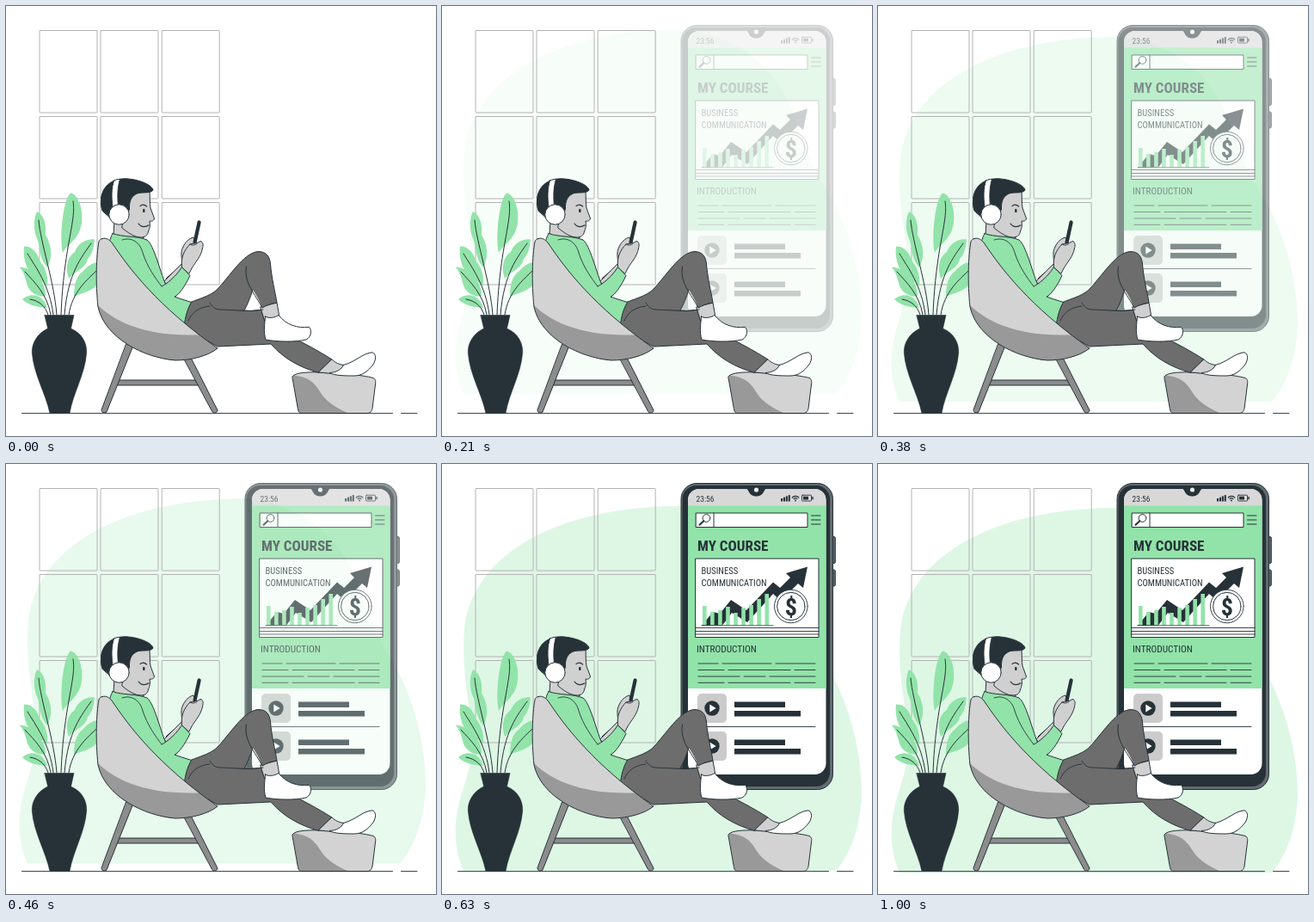
Animation, 500 px wide and 500 px high, one loop 1040 ms. Source, as an HTML page with a canvas:

```html
<!DOCTYPE html>
<html lang="en">
<head>
<meta charset="utf-8">
<title>Online course</title>
<style>
html, body { margin: 0; width: 100%; height: 100%; overflow: hidden; background: #fff; }
canvas { display: block; width: 100vw; height: 100vh; }
</style>
</head>
<body>
<canvas id="stage"></canvas>
<script>
const SIZE = 500, LOOP = 1040, START = 130, STEP = 1000 / 24, FADE_STEPS = 13, LAST_STEP = 22;
const INK = '#263238', GREEN = '#92e3a9', SKIN = '#d0d0d0', PANTS = '#6d6d6d';
const LIGHT = '#d3d3d3', SHADE = '#999', WHITE = '#fff', WIRE = '#b3b3b3';
const FACE = '"Roboto Condensed", Roboto, "Open Sans", "Noto Sans", sans-serif';
const scale = Math.max(1, window.devicePixelRatio || 1);

function setUp(canvas) {
  canvas.width = canvas.height = SIZE * scale;
  const c = canvas.getContext('2d');
  c.scale(scale, scale);
  c.lineJoin = c.lineCap = 'round';
  return c;
}

function layer(paint) {
  const canvas = document.createElement('canvas');
  paint(setUp(canvas));
  return canvas;
}

function shape(c, d, fill, stroke = INK, width = 1) {
  const p = typeof d === 'string' ? new Path2D(d) : d;
  if (fill) { c.fillStyle = fill; c.fill(p); }
  if (stroke) { c.strokeStyle = stroke; c.lineWidth = width; c.stroke(p); }
}

function line(c, d, color = INK, width = 1) { shape(c, d, null, color, width); }

function box(c, x, y, w, h, r, fill, stroke = null, width = 1) {
  const p = new Path2D();
  p.roundRect(x, y, w, h, r);
  shape(c, p, fill, stroke, width);
}

function disc(c, x, y, r, fill, stroke = null, width = 1) {
  const p = new Path2D();
  p.arc(x, y, r, 0, Math.PI * 2);
  shape(c, p, fill, stroke, width);
}

// Fills a body, shades the part under a second path, then outlines it.
function shaded(c, body, shadow) {
  shape(c, body, LIGHT, null);
  c.save();
  c.clip(new Path2D(body));
  shape(c, shadow, SHADE, null);
  c.restore();
  line(c, body);
}

function label(c, text, x, y, size, weight = 400, align = 'left') {
  c.font = `${weight} condensed ${size}px ${FACE}`;
  c.textAlign = align;
  c.fillStyle = INK;
  c.fillText(text, x, y);
}

const blobPath = new Path2D('M25 475 C16 455 13 430 18 405 C24 375 38 350 35 315 C32 280 22 240 26 195 ' +
  'C33 115 120 55 265 51 C335 49 385 92 405 140 C420 180 425 205 447 236 ' +
  'C470 272 488 330 488 385 C487 425 474 457 458 475 Z');

function drawWindow(c) {
  for (const y of [28.5, 128.5, 228.5])
    for (const x of [39, 110, 181.2]) box(c, x, y, 67, 95.5, 0.5, null, WIRE);
}

function drawStatus(c) {
  label(c, '23:56', 295.5, 44, 9.5);
  for (let i = 0; i < 4; i++) box(c, 394 + i * 2.9, 40 - i * 1.3, 2.1, 3.5 + i * 1.3, 0, INK);
  for (const r of [2.6, 5]) {
    const arc = new Path2D();
    arc.arc(411, 42.3, r, Math.PI * 1.23, Math.PI * 1.77);
    line(c, arc, INK, 1.2);
  }
  disc(c, 411, 42.4, 1, INK);
  box(c, 418.5, 36.2, 11, 6.8, 0.8, null, INK, 0.9);
  box(c, 420, 37.7, 6, 3.8, 0, INK);
  box(c, 430.3, 38, 1.4, 3.2, 0, INK);
}

function drawChart(c) {
  box(c, 295, 110, 143, 91.5, 0, WHITE, INK);
  line(c, 'M295 190.5 H438 M295 194.5 H438 M295 198 H438', INK, 0.9);
  label(c, 'BUSINESS', 301.5, 128.3, 10.6);
  label(c, 'COMMUNICATION', 301.5, 142.3, 10.6);
  shape(c, 'M302 188 L315 172 L323 174 L336 158 L354 170 L385 137.5 L393 144 L405 132 L400 127 ' +
    'L425 119.5 L420 144 L414 139 L394 159 L385 151 L355 184 L337 173 L326 187.5 Z', INK, null);
  [165, 172, 170, 166, 173, 167, 164, 157, 151].forEach((y, i) => box(c, 303 + i * 9.05, y, 4.6, 187.5 - y, 0, GREEN));
  line(c, 'M302 187.8 H385', INK, 0.8);
  disc(c, 405.8, 165.5, 19.3, WHITE, INK, 0.9);
  disc(c, 405.8, 165.5, 16.2, null, INK, 1);
  label(c, '$', 405.8, 175.5, 28, 700, 'center');
}

function drawLesson(c, y) {
  box(c, 297, y, 34, 34, 5, '#cbcbcb');
  disc(c, 314, y + 17, 8.7, INK);
  shape(c, `M311.3 ${y + 12.6} L318.6 ${y + 17} L311.3 ${y + 21.4} Z`, WHITE, null);
  box(c, 340, y + 9.5, 59, 6.5, 0, INK);
  box(c, 340, y + 20, 77, 6.5, 0, INK);
}

function drawPhone(c) {
  box(c, 453, 84.5, 4.3, 31, 1.5, '#5f686c', INK);
  box(c, 453, 123, 4.3, 19, 1.5, '#5f686c', INK);
  box(c, 278, 22.5, 176.5, 356, 18, '#626b6f', INK);
  box(c, 279.5, 25, 171.5, 350, 16, INK);

  c.save();
  const screen = new Path2D();
  screen.roundRect(286, 29, 160.5, 332, 13);
  c.clip(screen);
  box(c, 286, 29, 161, 332, 0, WHITE);
  box(c, 286, 29, 161, 20, 0, '#d8d8d8');
  box(c, 286, 48.5, 161, 212.5, 0, GREEN);
  c.restore();

  shape(c, 'M353 28 C357 28.5 356 37.5 365.5 37.5 C375 37.5 374 28.5 378 28 Z', INK, null);
  disc(c, 365.5, 30, 2.6, '#eee', null);
  drawStatus(c);

  box(c, 295.5, 57, 129.5, 16.5, 0, WHITE, INK);
  line(c, 'M316 57 V73.5 M429.5 60 H440 M429.5 65 H440 M429.5 70 H440');
  disc(c, 307.5, 63, 4.4, WHITE, INK);
  line(c, 'M304.3 66.3 L299.5 70.8', INK, 2);

  label(c, 'MY COURSE', 297, 100.5, 17, 700);
  drawChart(c);
  label(c, 'INTRODUCTION', 296, 218.5, 11.3);
  line(c, 'M298 232 H321 M326 232 H383 M388 232 H434 M298 239.5 H328 M333 239.5 H405 M410 239.5 H434 ' +
    'M298 247 H346 M351 247 H376 M381 247 H434 M298 254.3 H328 M333 254.3 H405 M410 254.3 H434', INK, 0.9);

  drawLesson(c, 267);
  line(c, 'M297 305.5 H434', INK, 0.9);
  drawLesson(c, 311);
}

function drawPlant(c) {
  const leaves = [
    'M66 287 C62 270 66 226 75 217.5 C84 219 90 236 88 252 C85 272 73 275 66 287 Z',
    'M48 304 C37 291 41 280 35 268 C32 258 32 247 36 239 C45 243 47 256 46 266 C54 280 54 292 48 304 Z',
    'M48 326 C40 317 33 319 27 308 C21 299 20 288 21 279.5 C30 279 37 287 39 296 C46 304 49 313 48 326 Z',
    'M46 337 C38 339 28 334 25 325 C22 315 21 309 15.5 303.5 C24 304 32 308 37 315 C43 321 46 329 46 337 Z',
    'M48 351 C38 350 27 349 19 341 C27 334 42 333 48 351 Z',
    'M73 317 C68 303 72 291 80 286 C84 275 95 270 103 271.5 C102 282 100 289 95 294 C93 305 82 307 73 317 Z',
    'M79 338 C79 322 83 313 89 309 C95 302 101 298 107 298 L108 322 C100 332 90 333 79 338 Z'
  ];
  for (const d of leaves) shape(c, d, GREEN, null);
  const stems = 'M78 227 C82 250 67 280 64 359 M38 249 C40 275 56 320 59 359 M25 288 C34 303 51 325 55 359 ' +
    'M22 309 C33 321 48 335 52 359 M28 341 C40 343 46 350 49 359 M99 276 C88 292 72 310 68 359 ' +
    'M105 308 C95 318 77 332 73 359';
  line(c, stems);
  shape(c, 'M45 359.5 H79 L75.5 375 C89 381 94 392 93.7 403 C92 428 78 450 74 473.5 H51 ' +
    'C46 450 32 428 30.3 403 C30 392 36 381 48.5 375 Z', INK, INK, 0.6);
}

function drawLegs(c) {
  shape(c, 'M208 350 L240 346 L248 353 L285 354.5 L299 353 L302 362 C312 378 345 389 379 411 L364 426.5 ' +
    'C340 420 322 409 308 393 L246 396 L200 370 Z', PANTS);
  shape(c, 'M379 411 C383 415 388 417 393 417.5 L385 428 L363.5 426 Z', SKIN);
  shape(c, 'M392.5 417.5 C406 414 415 403.5 426 402.8 C431 405 430 411 427.5 416 C421 425 414 430 405 430 ' +
    'C395 430 382 430 376 426.5 C384 426 390 423 392.5 417.5 Z', WHITE);
  shape(c, 'M296 350 L315 345 L318 362 L301 366 Z', SKIN);
  shape(c, 'M301.5 361 C306 364 313 362 317 359.5 C326 371 339 375 352.5 373.3 C356 377 355 385 349 388 ' +
    'C335 391 315 390.5 302 388 C299 378 301 370 301.5 361 Z', WHITE);
  const thigh = 'M213 345 C229 339 240 336 247 328 C264 309 278 286 294 285.5 C303 286 306.5 291 307.5 300 ' +
    'C309 318 313 332 315 345 C308 346 303 348 298 351';
  shape(c, thigh + ' C295 343 291 336 287 330 C284 339 281 347 277 354 L246 356 L208 360 Z', PANTS, null);
  line(c, thigh + ' C290 335 276 322 279.5 303 M287 330 C284 339 281 347 277 354');
  line(c, 'M237 345 C240 350 243 352.5 248 353 L285 354.5 L299 353 M212 366 C216 356 225 350 237 349', INK, 0.9);
}

function drawHead(c) {
  shape(c, 'M126 250 L125 266 C136 273 151 273 160 270 L155 250 Z', SKIN);
  shape(c, 'M141 222 L152 217 L167 216 C167.5 223 167 229 168 235 L172.5 247 C172 250 169 250.5 167 250 ' +
    'C168 255 167 259 165.5 262 C165 267 161 269 157 269 C149 269 141 263 135 258 Z', SKIN);
  shape(c, 'M112 238 C106 219 116 201 138 200.8 C154 201 170 208 171 214 C169 218 159 216.5 154 217.5 ' +
    'C146 220 143 227 143.5 236 L141 243 L121 246 Z', INK);
  shape(c, 'M125.5 203 C128 201.8 130 201.5 132.5 201.3 C129.5 212 129.5 221 130.5 233 L124 234 C122.5 222 122.5 212 125.5 203 Z', WHITE);
  disc(c, 131.5, 242.5, 11.7, WHITE, INK);
  c.fillStyle = INK;
  c.beginPath();
  c.ellipse(160.3, 238, 1.3, 2.3, 0, 0, Math.PI * 2);
  c.fill();
  line(c, 'M156 232.5 C158.5 230.5 161.5 231 163.5 233', INK, 1.2);
  line(c, 'M154 253 C157 257.5 162 257.5 166 254.8', INK, 1.1);
}

function drawTorso(c) {
  line(c, 'M186 317 L205 300');
  shape(c, 'M184 320 L205 299 L209 305 L190 326 Z', SKIN);
  shape(c, 'M124 264.5 C136 269 152 267 164 272 C172 278 179 308 185.5 323.5 C193 318 200 311 204.5 303.5 ' +
    'L214 313.5 C208 326 201 336 196 338 C201 340 208 342 215.5 344.5 C210 354 209 361 207 372 L170 352 ' +
    'L119 285 C119 276 122 268 124 264.5 Z', GREEN);
  line(c, 'M135 272 C146 268 156 275 159 287 C164 303 174 317 181 326 M185.5 323.5 L181 326', INK, 0.9);
}

function drawHands(c) {
  shape(c, 'M205 303 C205 294 202 287 206 280 C208 275 213 270 218 269 L221 277 L219 290 Z', SKIN);
  line(c, 'M224.6 251.5 L219.5 275', INK, 4.2);
  shape(c, 'M204.5 303.5 C203 293 207 284 214 277 C219 276 223 276 226 273.5 C229.5 274 229.5 278 228.5 282 ' +
    'C226.5 292 220 298 216 305 L213 311 Z', SKIN);
  line(c, 'M214 277 C217 279 220 278 222 276.5', INK, 0.9);
}

function drawChair(c) {
  shape(c, 'M128 435 H226 V441 H128 Z', '#8c8c8c');
  shape(c, 'M140 393 L147.5 396 L117 472 C114 474 111 473 111 470 Z', '#8c8c8c');
  shape(c, 'M207 410 L214.5 408 L246 470 C246 473 242 474.5 240 472 Z', '#8c8c8c');
}

function drawSeat(c) {
  shaded(c, 'M112 270.5 C117 269 120 272 123 275 C143 305 176 349 246 398 C235 407 215 412 197 412 ' +
    'C160 409 115 386 107 350 C104 322 105 290 108 274 C109 271.5 110 271 112 270.5 Z',
    'M105 346 C126 368 165 386 232 382 L260 400 L200 420 L100 400 Z');
}

function drawStool(c) {
  shaded(c, 'M333 431 C335 427 345 426 358 425.8 C385 426.5 415 429 427 432.5 C430 434 430 437 429.5 440 ' +
    'L426 468 C425 472 423 473.5 420 473.5 H343 C341 473 340 472 339.5 469 Z',
    'M330 429 C352 430 360 439 366 450 C374 462 386 468 399 474 H330 Z');
}

function drawScene(c) {
  line(c, 'M18.5 473.7 H449.5 M459.5 473.7 H478', INK, 1);
  drawPlant(c);
  drawChair(c);
  drawStool(c);
  drawLegs(c);
  drawHead(c);
  drawTorso(c);
  drawHands(c);
  drawSeat(c);
}

const ctx = setUp(document.getElementById('stage'));
const phone = layer(drawPhone), scene = layer(drawScene);

function drawBlob(step, alpha) {
  const settle = Math.max(0, (step - FADE_STEPS) / (LAST_STEP - FADE_STEPS));
  const y = -30 + 28 * alpha + 2 * settle * (2 - settle);
  ctx.save();
  ctx.globalAlpha = alpha * 0.3;
  ctx.translate(0, y);
  shape(ctx, blobPath, GREEN, null);
  ctx.restore();
}

function render(ms) {
  const t = ms % LOOP;
  const step = t < START ? 0 : Math.min(LAST_STEP, 1 + Math.floor((t - START + 9) / STEP));
  const alpha = Math.min(1, step / FADE_STEPS);
  ctx.fillStyle = WHITE;
  ctx.fillRect(0, 0, SIZE, SIZE);
  if (step) drawBlob(step, alpha);
  drawWindow(ctx);
  ctx.globalAlpha = alpha;
  ctx.drawImage(phone, 0, 0, SIZE, SIZE);
  ctx.globalAlpha = 1;
  ctx.drawImage(scene, 0, 0, SIZE, SIZE);
}

function tick() {
  render(performance.now());
  requestAnimationFrame(tick);
}
tick();
</script>
</body>
</html>
```
